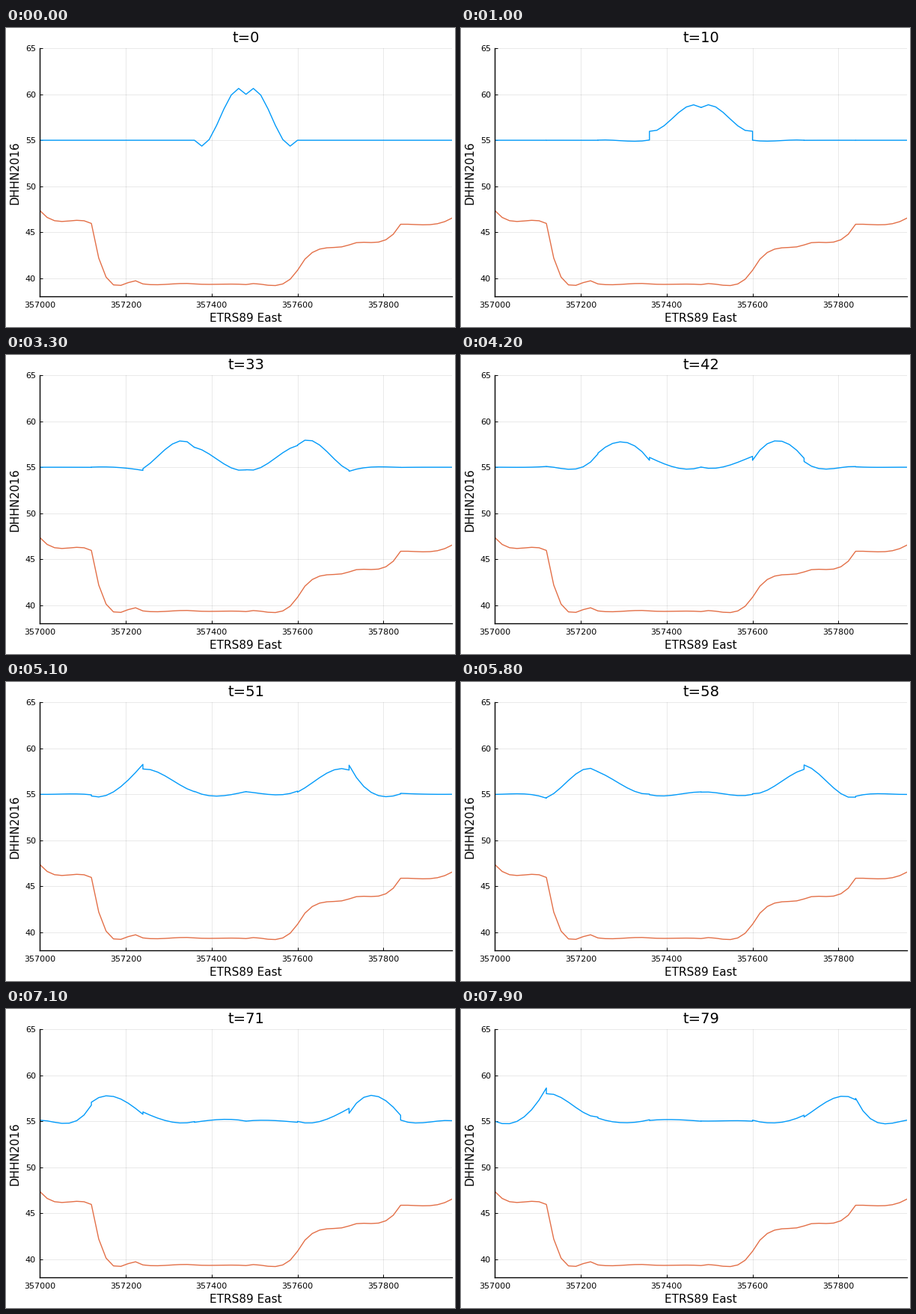
A matplotlib script for the animation above (8000 ms loop, 600 by 400 pixels).

```python
import numpy as np
import matplotlib.pyplot as plt
from matplotlib.animation import FuncAnimation

W, H = 600, 400
LEFT, RIGHT, TOP, BOTTOM = 45.2, 596.2, 27.2, 359.2
X0, LENGTH, CELLS = 357000, 960, 8
FRAMES, SUBSTEPS = 80, 5
GRAVITY, REST, RAISED = 1.0, 55.0, 60.0

# Cubic elements on Gauss-Lobatto nodes
nodes = np.array([-1, -1 / np.sqrt(5), 1 / np.sqrt(5), 1])
EDGE_WEIGHT = 1 / 6
to_poly = np.linalg.inv(np.vander(nodes, 4))
powers = np.column_stack([3 * nodes**2, 2 * nodes, np.ones(4), np.zeros(4)])
D = powers @ to_poly
to_plot = np.vander(np.linspace(-1, 1, 8), 4) @ to_poly

size = LENGTH / CELLS
starts = X0 + size * np.arange(CELLS)[:, None]
x_nodes = starts + size * (nodes + 1) / 2
x_plot = (starts + size * np.linspace(0, 1, 8)).ravel()

# River bed at the nodes; neighbouring elements share their end values
bed_points = np.array([
    47.35, 46.26, 46.29, 45.95, 40.20, 39.53, 39.37, 39.28, 39.41,
    39.37, 39.32, 39.35, 39.30, 39.345, 39.39, 40.85, 42.75, 43.34,
    43.61, 43.90, 44.20, 45.86, 45.83, 45.93, 46.54])
bed = bed_points[3 * np.arange(CELLS)[:, None] + np.arange(4)]
bed_slope = bed @ D.T


def flux(q):
    h, m = q
    return np.array([m, m * m / h + GRAVITY * h * h / 2])


def surface_flux(ql, qr):
    """Local Lax-Friedrichs flux."""
    speed = (np.maximum(abs(ql[1] / ql[0]), abs(qr[1] / qr[0]))
             + np.sqrt(GRAVITY * np.maximum(ql[0], qr[0])))
    return (flux(ql) + flux(qr)) / 2 - speed * (qr - ql) / 2


def mean_pairs(a):
    return (a[:, :, None] + a[:, None, :]) / 2


def rhs(q):
    """Well-balanced split-form shallow water equations."""
    h, m = q
    f_mass = mean_pairs(m)
    f_mom = (f_mass * mean_pairs(m / h)
             + GRAVITY * h[:, :, None] * h[:, None, :] / 2)
    dq = 2 * np.array([(D * f_mass).sum(2), (D * f_mom).sum(2)])
    dq[1] += GRAVITY * h * bed_slope

    first, last = q[:, :, 0], q[:, :, -1]
    inflow = np.array([[REST - bed[0, 0]], [0.0]])
    outflow = np.array([[REST - bed[-1, -1]], [0.0]])
    f = surface_flux(np.hstack([inflow, last]), np.hstack([first, outflow]))
    dq[:, :, 0] -= (f[:, :-1] - flux(first)) / EDGE_WEIGHT
    dq[:, :, -1] += (f[:, 1:] - flux(last)) / EDGE_WEIGHT
    return -dq * 2 / size


def rk4(q, dt):
    k1 = rhs(q)
    k2 = rhs(q + dt / 2 * k1)
    k3 = rhs(q + dt / 2 * k2)
    k4 = rhs(q + dt * k3)
    return q + dt / 6 * (k1 + 2 * k2 + 2 * k3 + k4)


def simulate():
    level = np.where(abs(x_nodes - X0 - LENGTH / 2) < 50, RAISED, REST)
    q = np.array([level - bed, np.zeros_like(bed)])
    levels = []
    for _ in range(FRAMES):
        levels.append(((q[0] + bed) @ to_plot.T).ravel())
        for _ in range(SUBSTEPS):
            q = rk4(q, 1 / SUBSTEPS)
    return levels


levels = simulate()

plt.rcParams["font.family"] = "DejaVu Sans"
fig = plt.figure(figsize=(W / 100, H / 100), dpi=100, facecolor="white")
ax = fig.add_axes([LEFT / W, 1 - BOTTOM / H,
                   (RIGHT - LEFT) / W, (BOTTOM - TOP) / H])
ax.set(xlim=(X0, X0 + LENGTH), ylim=(38, 65),
       xticks=range(X0, X0 + LENGTH, 200), yticks=range(40, 66, 5))
ax.tick_params(direction="in", length=2.6, width=0.7,
               labelbottom=False, labelleft=False)
ax.set_axisbelow(True)
ax.grid(color="black", alpha=0.1, linewidth=0.6)
ax.spines[["top", "right"]].set_visible(False)
ax.spines[["left", "bottom"]].set_linewidth(1)


def label(x, y, text, size, ha="center", **kw):
    return fig.text(x / W, 1 - y / H, text, fontsize=size,
                    ha=ha, va="baseline", **kw)


for tick in ax.get_xticks():
    px = LEFT + (tick - X0) / LENGTH * (RIGHT - LEFT)
    label(px, 374, f"{tick:.0f}", 8)
for tick in ax.get_yticks():
    py = BOTTOM - (tick - 38) / 27 * (BOTTOM - TOP)
    label(39.8, py + 4.2, f"{tick:.0f}", 8, ha="right")

mid_x, mid_y = (LEFT + RIGHT) / 2, (TOP + BOTTOM) / 2
label(mid_x, 393.3, "ETRS89 East", 11)
label(16.3, mid_y, "DHHN2016", 11, rotation=90, rotation_mode="anchor")
title = label(mid_x, 19.3, "t=0", 14)

water, = ax.plot(x_plot, levels[0], color="#009AFA", linewidth=1)
ax.plot(x_plot, (bed @ to_plot.T).ravel(), color="#E36F47", linewidth=1)


def draw(t):
    water.set_ydata(levels[t])
    title.set_text(f"t={t}")
    return water, title


anim = FuncAnimation(fig, draw, frames=FRAMES, interval=100,
                     repeat=True, repeat_delay=0, blit=False)
plt.show()
```
